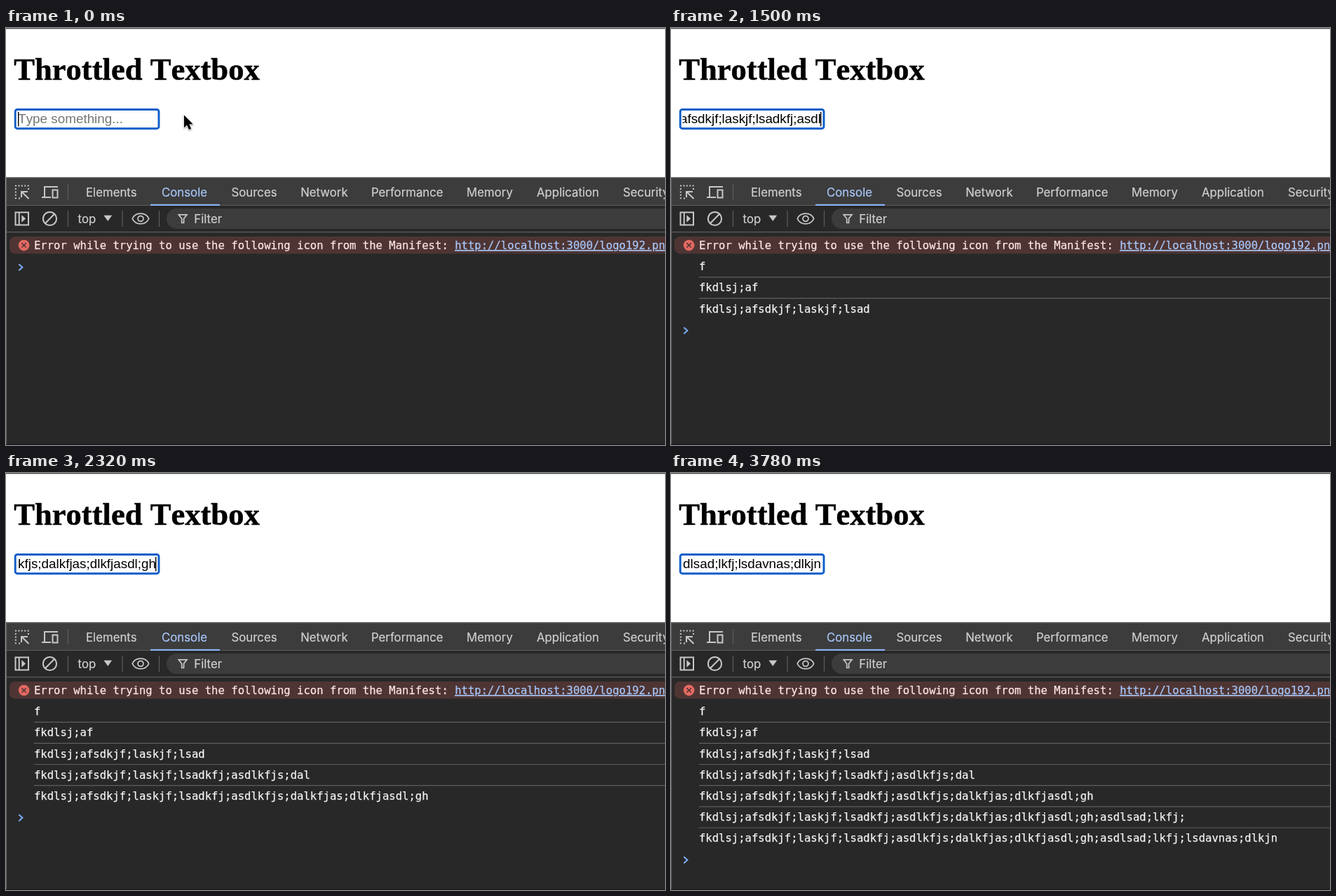
Animation of 940x596 px, one loop 3.94 s. Source, as an HTML page:

```html
<!DOCTYPE html>
<html lang="en">
<head>
<meta charset="utf-8">
<title>Throttled Textbox</title>
<style>
  html, body { margin: 0; width: 100%; height: 100%; overflow: hidden; background: #fff; }
  svg { display: block; width: 940px; height: 596px; }
  text { white-space: pre; }
  .title { font: bold 44.6px "Liberation Serif", serif; font-kerning: none; stroke: #000; stroke-width: .5; }
  .field { font: 18.85px "Liberation Sans", sans-serif; font-kerning: none; }
  .ui { font: 16.8px Inter, sans-serif; fill: #d0d0d0; stroke: #d0d0d0; stroke-width: .2; }
  .ui.active { fill: #a8c7fa; stroke: #a8c7fa; }
  .mono { font: 15.58px "DejaVu Sans Mono", monospace; fill: #f4f4f4; stroke: #f4f4f4; stroke-width: .25; }
  .mono.error { fill: #fbe6e4; stroke: #fbe6e4; }
  .link { fill: #a8c7fa; stroke: #a8c7fa; text-decoration: underline 1.4px; text-underline-offset: 2px; }
  .icon { fill: none; stroke: #c7c7c7; stroke-width: 2; }
  .solid { fill: #c7c7c7; stroke: none; }
  .rule { stroke: #5e5e5e; stroke-width: 1.2; }
</style>
</head>
<body>
<svg viewBox="0 0 940 596">
  <defs>
    <clipPath id="inner"><rect x="16.5" y="118" width="198.5" height="25"/></clipPath>
  </defs>

  <!-- page -->
  <rect width="940" height="596" fill="#fff"/>
  <rect width="940" height="1.3" fill="#4a4a4a"/>
  <text class="title" x="11.2" y="73.5">Throttled Textbox</text>
  <rect x="13.2" y="116.5" width="204.8" height="27.2" rx="3" fill="#fff" stroke="#0a5dc8" stroke-width="2.9"/>
  <text class="field" id="hint" x="17.2" y="136" fill="#757575">Type something...</text>
  <g clip-path="url(#inner)"><text class="field" id="typed" y="136"></text></g>
  <rect id="caret" y="120" width="1.4" height="20.5"/>
  <path id="pointer" d="M254 124.5v18l4.1-3.8 2.9 6.6 3.2-1.4-2.8-6.4h5.4z"
    stroke="#fff" stroke-width="1.4" paint-order="stroke" style="filter:drop-shadow(0 1px 1px #0006)"/>

  <!-- developer tools -->
  <rect y="213.6" width="940" height="383" fill="#282828"/>
  <rect y="213.6" width="940" height="40" fill="#3c3c3c"/>
  <path class="rule" d="M0 214.2H940M0 253.5H940M0 291.7H940M88.5 223V245M88.5 261V284M166 261V284M218.5 261V284M.5 214V596"/>
  <rect x="206" y="251.8" width="99" height="2.2" fill="#8ab4f8"/>
  <rect x="229" y="258" width="740" height="29" rx="14.5" fill="#3c3c3c"/>
  <g id="tabs"></g>
  <text class="ui" x="102.6" y="279">top</text>
  <text class="ui" x="268.3" y="279">Filter</text>

  <g class="icon">
    <path d="M13 225.5H33" stroke-dasharray="2 2.4"/>
    <path d="M13.8 229V245" stroke-dasharray="2 2.4"/>
    <path d="M18 243.5H21.5M32 229V232" stroke-dasharray="2 2"/>
    <path d="M32.5 244L22.5 234.3M22 242V234H31"/>
    <path d="M74 227H55V241M51 242H64"/>
    <rect x="66.5" y="231.5" width="7" height="11"/>
    <rect x="13.5" y="263.5" width="18.5" height="18"/>
    <path d="M18.7 264V281"/>
    <path class="solid" d="M22.3 267.3V277.7L28 272.5z"/>
    <circle cx="62.5" cy="272.5" r="9.6"/>
    <path d="M55.8 279.2L69.2 265.8"/>
    <path class="solid" d="M139.4 267.7H151.2L145.3 276z"/>
    <path d="M180.3 272.5C184.5 262.7 199.5 262.7 203.7 272.5C199.5 282.3 184.5 282.3 180.3 272.5z" stroke-width="1.8"/>
    <circle cx="192" cy="272.5" r="3.9" stroke-width="1.8"/>
    <path d="M246.3 266.8H258L253.6 272.5V278.5H250.7V272.5z" stroke-width="1.7"/>
  </g>

  <rect x="5" y="298" width="960" height="24.5" rx="8" fill="#4e3534"/>
  <circle cx="25.6" cy="310.6" r="7.8" fill="#e46962"/>
  <path d="M22.4 307.4l6.4 6.4m0-6.4l-6.4 6.4" stroke="#4e3534" stroke-width="1.5"/>
  <text class="mono error" x="39.9" y="316.3">Error while trying to use the following icon from the Manifest: <tspan class="link">http://localhost:3000/logo192.png</tspan></text>

  <g id="logs"></g>
  <path id="prompt" d="M18.3 337.4L23.4 342L18.3 346.6" fill="none" stroke="#7cacf8" stroke-width="2"/>
  <rect y="594.8" width="940" height="1.2" fill="#151515"/>
</svg>
<script>
const LOOP = 3940, TICK = 20, FIRST_LOG = 300, THROTTLE = 500, BLINK_OFF = 3680;
const ROW = 30.17, LEFT = 17, RIGHT = 214;
const TEXT = "fkdlsj;afsdkjf;laskjf;lsadkfj;asdlkfjs;dalkfjas;dlkfjasdl;gh;asdlsad;lkfj;lsdavnas;dlkjn";

// typing pace: [ms, characters entered]
const PACE = [[240, 1], [560, 6], [600, 7], [780, 9], [1300, 26], [1500, 34], [1580, 35],
  [1800, 42], [1860, 45], [1939, 45], [1940, 46], [2300, 60], [2400, 61], [2440, 63],
  [2619, 63], [2620, 64], [2800, 74], [3100, 86], [3140, 87], [3180, 88]];

const $ = id => document.getElementById(id);
const make = (tag, attrs, parent, text = "") => {
  const el = document.createElementNS("http://www.w3.org/2000/svg", tag);
  for (const key in attrs) el.setAttribute(key, attrs[key]);
  el.textContent = text;
  return parent.appendChild(el);
};
const show = (el, on) => el.setAttribute("visibility", on ? "visible" : "hidden");

const tabs = { Elements: 114, Console: 222, Sources: 321.5, Network: 420.2,
  Performance: 520.9, Memory: 657.1, Application: 757, Security: 880 };
for (const name in tabs) {
  const tab = make("text", { class: "ui", x: tabs[name], y: 241 }, $("tabs"), name);
  tab.classList.toggle("active", name === "Console");
}

function typedCount(t) {
  if (t < PACE[0][0]) return 0;
  const i = PACE.findIndex(p => p[0] > t);
  if (i < 0) return TEXT.length;
  const [t0, n0] = PACE[i - 1], [t1, n1] = PACE[i];
  return Math.floor(n0 + (n1 - n0) * (t - t0) / (t1 - t0));
}

const rows = [];
for (let k = 0; k < 7; k++) {
  const time = FIRST_LOG + k * THROTTLE, y = k * ROW;
  const g = make("g", {}, $("logs"));
  if (k) make("path", { class: "rule", d: `M40 ${326 + y}H940` }, g);
  make("text", { class: "mono", x: 39.9, y: 346.2 + y }, g, TEXT.slice(0, typedCount(time)));
  rows.push({ g, time });
}

function draw(ms) {
  const t = Math.floor(ms % LOOP / TICK) * TICK;
  const n = typedCount(t), typed = $("typed");
  typed.textContent = TEXT.slice(0, n);
  const width = n ? typed.getComputedTextLength() : 0;
  const x = Math.min(LEFT, RIGHT - width);
  typed.setAttribute("x", x);
  $("caret").setAttribute("x", Math.min(x + width, RIGHT - 1));
  show($("caret"), t < BLINK_OFF);
  show($("hint"), !n);
  show($("pointer"), !n);

  let count = 0;
  for (const { g, time } of rows) {
    show(g, t >= time);
    if (t >= time) count++;
  }
  $("prompt").setAttribute("transform", `translate(0 ${count * ROW})`);
}

const start = performance.now();
function frame() {
  draw(performance.now() - start);
  requestAnimationFrame(frame);
}
frame();
</script>
</body>
</html>
```
